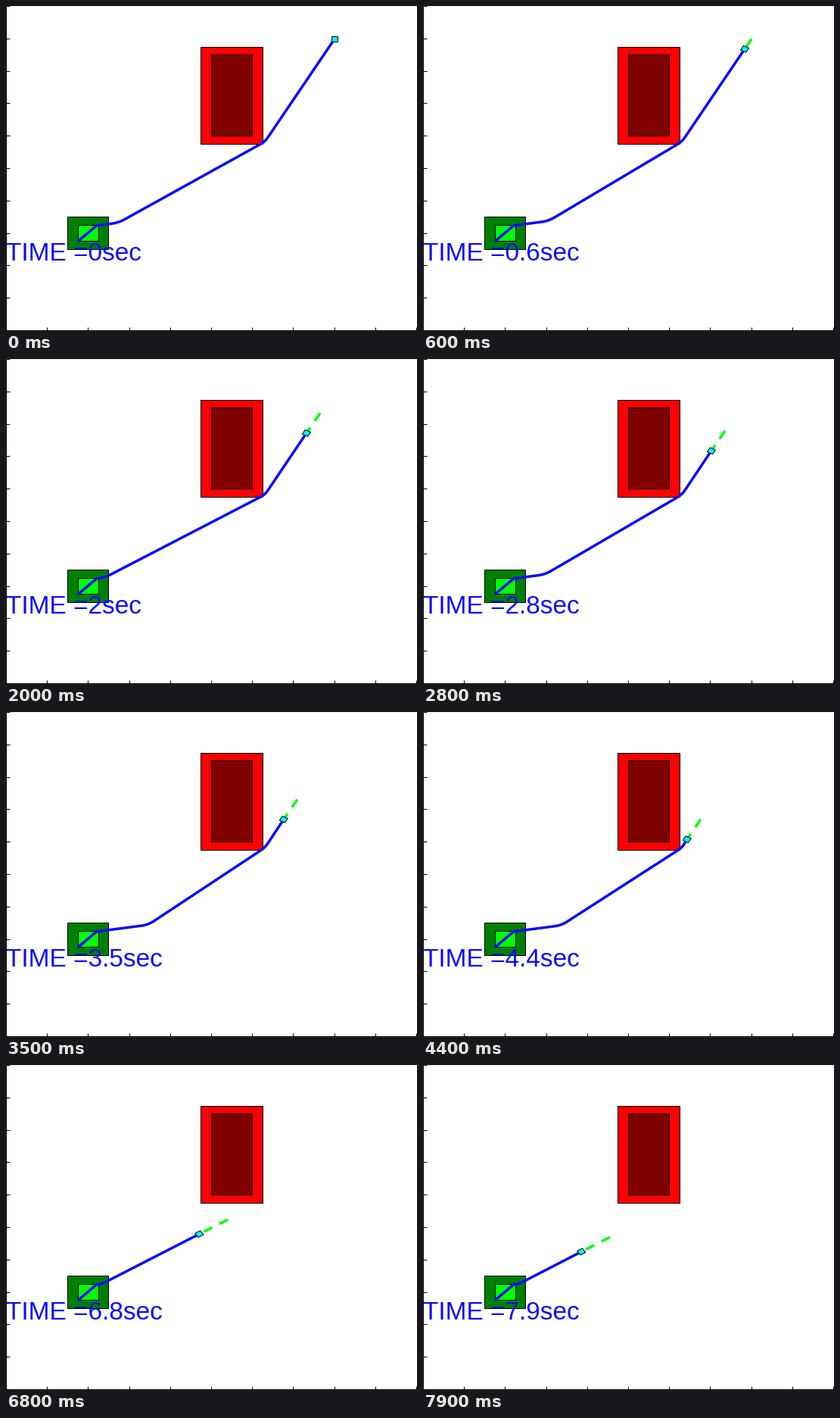
A matplotlib script that plays this animation: 543x429 px, repeating every 8 s.

```python
import numpy as np
import matplotlib.pyplot as plt
from matplotlib.animation import FuncAnimation
from matplotlib.patches import Polygon, Rectangle

W, H = 543, 429
FRAMES, STEP = 80, 100
UX, UY = (W - 1) / 20, (H - 1) / 20      # pixels per world unit
BLUE = "#0a0aff"

fig = plt.figure(figsize=(W / 72 + 1e-6, H / 72 + 1e-6), dpi=72, facecolor="white")
ax = fig.add_axes([0, 0, 1, 1])
ax.set_xlim(0, W)
ax.set_ylim(H, 0)
ax.axis("off")


def stroke(xs, ys, color="black", lw=1, **kw):
    return ax.plot(xs, ys, color=color, lw=lw, solid_capstyle="butt", **kw)[0]


def box(x0, y0, x1, y1, color):
    """Outlined box given in world units, y counted from the top."""
    ax.add_patch(Rectangle((x0 * UX - 0.1, y0 * UY + 0.1), (x1 - x0) * UX,
                           (y1 - y0) * UY, fc=color, ec="black", lw=1, zorder=1))


# Frame lines and ticks; whole numbers snap to that pixel row or column
stroke([0, W], [0, 0], "#ececec")
stroke([0, 0], [0, H])
stroke([0, W], [H - 1, H - 1])
for k in range(11):
    x, y = 2 * UX * k, 2 * UY * k
    stroke([x, x], [H - 5, H - 1])
    stroke([0, 5], [y, y])

box(9.5, 2.5, 12.5, 8.5, "#ff0000")
box(10, 3, 12, 8, "#800000")
box(3, 13, 5, 15, "#008000")
box(3.5, 13.5, 4.5, 14.5, "#00ff00")

# The vehicle runs at even speed between these times and places
LEG_T = [0.15, 4.6, 4.8, 7.9]
LEG_X = [434, 344.8, 339, 209.3]
LEG_Y = [43.6, 174, 180.8, 246.4]

CORNER = np.array([342.2, 179])
GATE, GOAL = np.array([119.8, 289.8]), np.array([94.8, 310.8])

# The last bend of the planned route slides along a line out of the gate
BEND_T = [0, 0.6, 2, 3.5, 4.4, 5]
BEND = [29, 46, 11, 68, 63, 7]


def position(t):
    return np.column_stack([np.interp(t, LEG_T, LEG_X), np.interp(t, LEG_T, LEG_Y)])


def rounded(a, b, c, r):
    """Curve that cuts the corner b on the way from a to c."""
    def towards(p):
        d = np.hypot(*(p - b))
        return b + (p - b) * min(r / d, 0.5)
    s = np.linspace(0, 1, 7)[:, None]
    return (1 - s) ** 2 * towards(a) + 2 * s * (1 - s) * b + s ** 2 * towards(c)


def plan(t, here):
    bend = GATE + np.interp(t, BEND_T, BEND) * np.array([1, -0.13])
    parts, start = [[here]], here
    if t < LEG_T[1]:
        parts.append(rounded(here, CORNER, bend, 7))
        start = CORNER
    parts += [rounded(start, bend, GATE, 9), [GATE, GOAL]]
    return np.vstack(parts)


def vehicle(t, here):
    """Small square turned to the heading in world units."""
    angle = 0
    if t > 0:
        a, b = position([t, t + 0.1]) if t < 0.2 else position([t - 0.1, t])
        angle = np.arctan2((a[1] - b[1]) / UY, (b[0] - a[0]) / UX)
    turn = angle + np.pi / 4 + np.arange(4) * np.pi / 2
    r = 0.15 * np.sqrt(2)
    return np.column_stack([here[0] + r * UX * np.cos(turn),
                            here[1] - r * UY * np.sin(turn)])


LINE = 3.5
route = stroke([], [], BLUE, LINE, zorder=4, solid_joinstyle="round", snap=False)
trail = stroke([], [], "#00ff00", LINE, zorder=3, snap=False,
               ls=(0, (12.5 / LINE, 10.5 / LINE)), dash_capstyle="butt")
car = Polygon([(0, 0), (1, 0), (1, 1)], fc="#00ffff", ec="black", lw=1, zorder=5)
ax.add_patch(car)
label = ax.text(0, 336, "", color=BLUE, fontsize=33.4, family="Liberation Sans",
                va="baseline", ha="left", zorder=6)


def draw(i):
    t = i / 10
    past = position(np.arange(max(0, i - 9), i + 1) / 10)
    here = past[-1]
    trail.set_data(*past.T)
    route.set_data(*plan(t, here).T)
    car.set_xy(vehicle(t, here))
    label.set_text(f"TIME ={t:g}sec")
    return trail, route, car, label


anim = FuncAnimation(fig, draw, frames=FRAMES, interval=STEP, repeat=True,
                     repeat_delay=0, blit=False)
plt.show()
```
